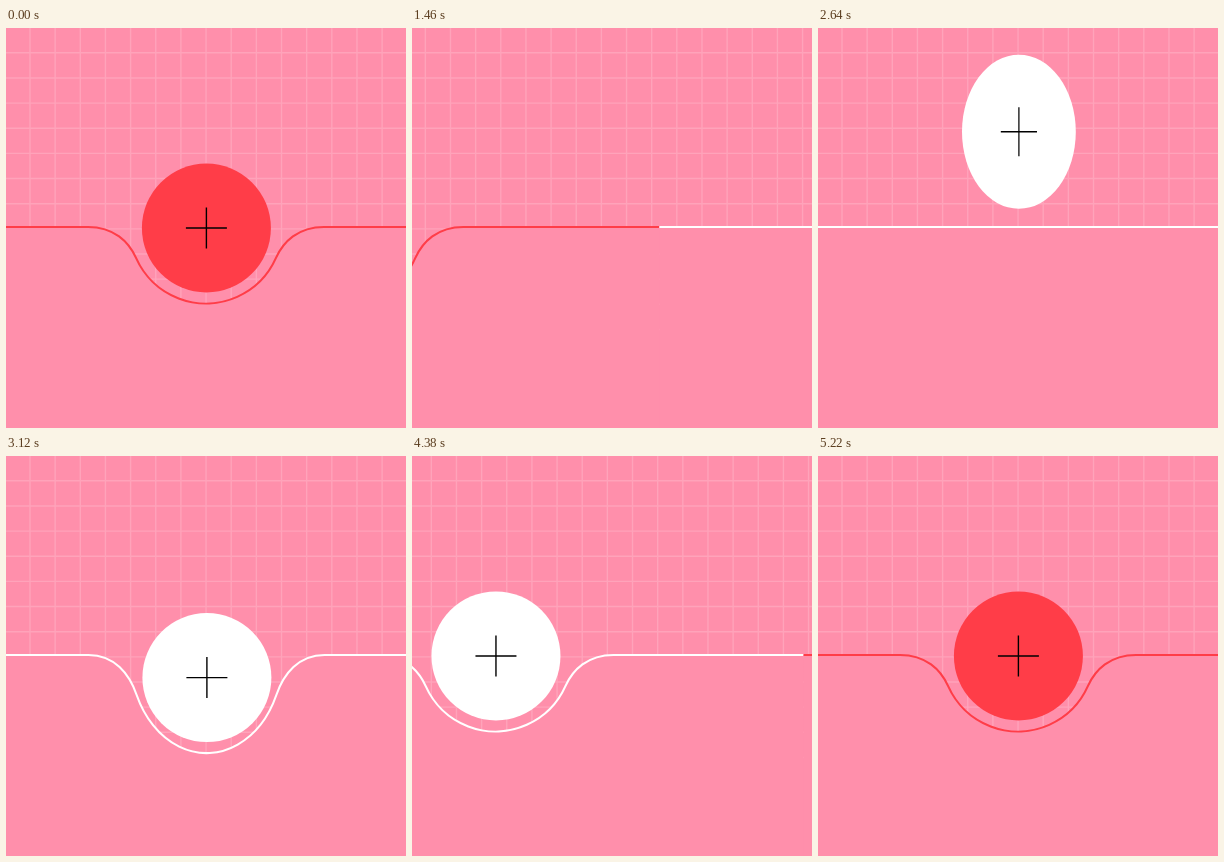
Write an HTML page with a canvas that moves like this. It is 400 px wide and 400 px high and loops after 5240 ms.

```html
<!DOCTYPE html>
<html lang="en">
<head>
<meta charset="utf-8">
<title>Bouncing button</title>
<style>
html, body { margin: 0; width: 100%; height: 100%; overflow: hidden; background: #ff8fab; }
canvas { display: block; width: 400px; height: 400px; }
</style>
</head>
<body>
<canvas id="stage" width="400" height="400"></canvas>
<script>
const ctx = document.getElementById('stage').getContext('2d');
const LOOP = 5240, PINK = '#ff8fab', RED = '#ff3d48', WHITE = '#fff';
const CELL = 25.15, STEP = 628.5, LINE_Y = 199;
const RADIUS = 64.5, NOTCH = 76.5, ARM = 20.5;

const clamp = v => Math.min(1, Math.max(0, v));
const progress = (t, from, to) => clamp((t - from) / (to - from));

// Rises from 0 to 1 and back between two times
const bump = (t, from, to) => Math.sin(Math.PI * progress(t, from, to)) ** 2;

// Cubic bezier ease (.3, 0, 0, 1), solved by bisection
function slide(t, start) {
  const x = progress(t, start, start + 900);
  let lo = 0, hi = 1;
  for (let i = 0; i < 24; i++) {
    const u = (lo + hi) / 2;
    if (.9 * u * (1 - u) ** 2 + u ** 3 < x) lo = u; else hi = u;
  }
  return lo * lo * (3 - 2 * lo);
}

// Height of the jump, then a damped swing after landing
function jump(t) {
  const land = 3060, p = progress(t, 2505, land);
  if (p < 1) return -111 * (1 - Math.abs(2 * p - 1) ** 3);
  const s = t - land;
  return 57 * Math.exp(-.0052 * s) * Math.sin(Math.PI * s / 350);
}

function drawGrid(shift) {
  ctx.beginPath();
  for (let x = 24 - shift % CELL; x < 402; x += CELL) {
    ctx.moveTo(x, 0);
    ctx.lineTo(x, 300);
  }
  for (let y = 24.8; y < 310; y += CELL) {
    ctx.moveTo(0, y);
    ctx.lineTo(400, y);
  }
  ctx.strokeStyle = '#ffa3ba';
  ctx.lineWidth = 1.4;
  ctx.stroke();
}

// Ground line with a notch of relative width w and depth h
function groundPath({ x, from, to, w, h }) {
  const angle = .42, px = n => x + n * w, py = n => LINE_Y + n * h;
  const edgeX = NOTCH * Math.cos(angle), edgeY = NOTCH * Math.sin(angle);
  const pullX = edgeX + 18 * Math.sin(angle), pullY = edgeY - 18 * Math.cos(angle);
  const p = new Path2D();
  p.moveTo(from, LINE_Y);
  p.lineTo(px(-118), LINE_Y);
  p.bezierCurveTo(px(-92), LINE_Y, px(-pullX), py(pullY), px(-edgeX), py(edgeY));
  p.ellipse(x, LINE_Y, NOTCH * w, NOTCH * h, 0, Math.PI - angle, angle, true);
  p.bezierCurveTo(px(pullX), py(pullY), px(92), LINE_Y, px(118), LINE_Y);
  p.lineTo(to, LINE_Y);
  return p;
}

function drawGround(tile) {
  const line = groundPath(tile), body = new Path2D(line);
  body.lineTo(tile.to, 400);
  body.lineTo(tile.from, 400);
  ctx.fillStyle = PINK;
  ctx.fill(body);
  ctx.strokeStyle = tile.color;
  ctx.lineWidth = 2.1;
  ctx.stroke(line);
}

function drawBall({ x, y, sx, sy, color }) {
  ctx.save();
  ctx.translate(x + .4, 200 + y);
  ctx.scale(sx, sy);
  ctx.beginPath();
  ctx.arc(0, 0, RADIUS, 0, 2 * Math.PI);
  ctx.fillStyle = color;
  ctx.fill();
  ctx.beginPath();
  ctx.moveTo(-ARM, 0);
  ctx.lineTo(ARM, 0);
  ctx.moveTo(0, -ARM);
  ctx.lineTo(0, ARM);
  ctx.strokeStyle = '#000';
  ctx.lineWidth = 1.4;
  ctx.stroke();
  ctx.restore();
}

function draw(t) {
  const shift = STEP * (slide(t, 1269) + slide(t, 4245));
  const beat = bump(t, 365, 980), grow = 1 + .15 * beat;
  const crouch = bump(t, 2350, 2560);
  const stretch = bump(t, 2520, 2770) + .3 * bump(t, 2900, 3120) - .7 * crouch;
  const y = jump(t) + 8 * crouch;

  const rest = { y: 0, sx: 1, sy: 1, w: 1, h: 1, color: RED };
  const tiles = [
    { ...rest, x: 200, from: -100, to: 514, sx: grow, sy: grow, w: 1 + .02 * beat, h: 1 + .125 * beat },
    { ...rest, x: 829, from: 514, to: 1137, color: WHITE, y, sx: 1 - .118 * stretch, sy: 1 + .195 * stretch,
      w: 1 + .15 * crouch, h: Math.max(0, 1 + y / NOTCH) },
    { ...rest, x: 200 + 2 * STEP, from: 1137, to: 1800 }
  ];

  ctx.fillStyle = PINK;
  ctx.fillRect(0, 0, 400, 400);
  drawGrid(shift * CELL / STEP);
  ctx.save();
  ctx.translate(-shift, 0);
  tiles.forEach(drawGround);
  tiles.forEach(drawBall);
  ctx.restore();
}

const start = performance.now();
function tick() {
  draw((performance.now() - start) % LOOP);
  requestAnimationFrame(tick);
}
tick();
</script>
</body>
</html>
```
